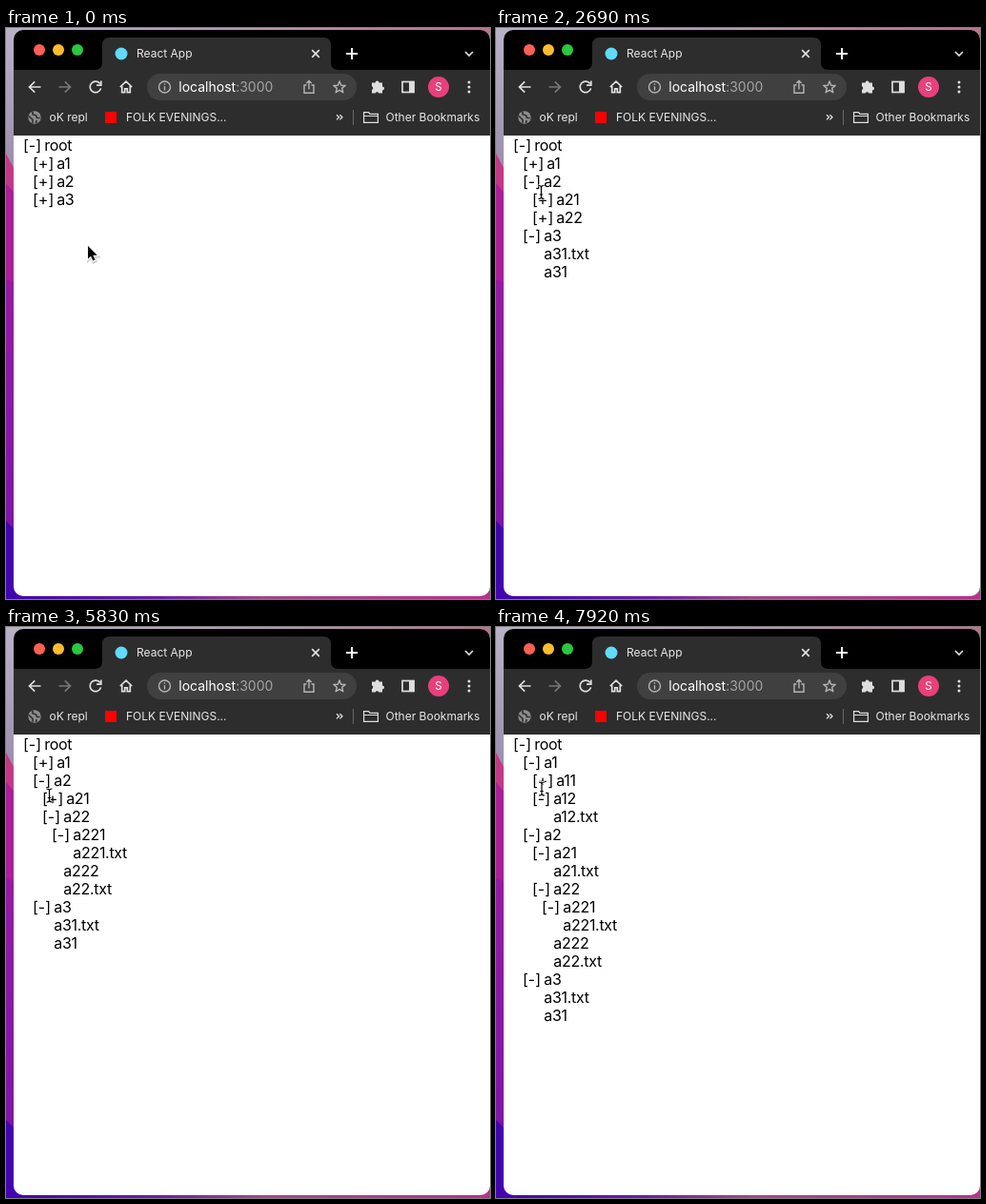
Recreate the animation shown at these times as an HTML page. Size 508 by 600 pixels, loop 8000 ms.

```html
<!DOCTYPE html>
<html lang="en">
<head>
<meta charset="utf-8">
<title>Folder tree</title>
<style>
  html, body { margin: 0; width: 100%; height: 100%; overflow: hidden; background: #fff; }
  svg { display: block; }
  text { font-family: Inter, "Open Sans", sans-serif; font-feature-settings: "calt" 0; white-space: pre; }
  .ui { font-size: 12px; fill: #e8e8e8; }
  .url { font-size: 14px; fill: #fff; }
  .icon { fill: none; stroke: #dedede; stroke-width: 1.7; }
  .thin { stroke: #b4b4b4; stroke-width: 1.4; }
  #tree { font-size: 16px; fill: #000; }
  #tree .name { letter-spacing: -.3px; }
</style>
</head>
<body>
<svg width="508" height="600" viewBox="0 0 508 600">
  <defs>
    <clipPath id="frame"><rect x="8" y="2" width="500" height="595" rx="10"/></clipPath>
    <linearGradient id="side" x1="0" y1="0" x2="0" y2="1">
      <stop offset="0" stop-color="#b9b2c6"/><stop offset=".24" stop-color="#9c8fae"/>
    </linearGradient>
    <linearGradient id="violet" x1="0" y1="0" x2="0" y2="1">
      <stop offset="0" stop-color="#961ca4"/><stop offset="1" stop-color="#7716a6"/>
    </linearGradient>
    <linearGradient id="top">
      <stop offset="0" stop-color="#b9b2c6"/><stop offset=".5" stop-color="#b59ab2"/><stop offset="1" stop-color="#c0708f"/>
    </linearGradient>
    <linearGradient id="base">
      <stop offset="0" stop-color="#4206b0"/><stop offset=".3" stop-color="#6a1fa6"/>
      <stop offset=".52" stop-color="#a04a86"/><stop offset="1" stop-color="#b8318f"/>
    </linearGradient>
  </defs>

  <!-- desktop -->
  <rect width="508" height="600" fill="url(#side)"/>
  <path d="M0 132L16 162V300H0Z" fill="#c23a86"/>
  <path d="M0 163L16 182V300H0Z" fill="#ab1f98"/>
  <path d="M0 264L16 270V600H0Z" fill="url(#violet)"/>
  <path d="M0 518L16 534V600H0Z" fill="#4206b0"/>
  <rect x="12" width="496" height="20" fill="url(#top)"/>
  <rect x="12" y="580" width="496" height="20" fill="url(#base)"/>

  <g clip-path="url(#frame)">
    <rect x="8" y="2" width="500" height="595" fill="#fff"/>
    <rect x="8" y="2" width="500" height="42" fill="#000"/>
    <rect x="8" y="44" width="500" height="69" fill="#2d2d2d"/>
    <path d="M93 44Q101 44 101 36V18Q101 10 109 10H333Q341 10 341 18V36Q341 44 349 44Z" fill="#2d2d2d"/>
  </g>

  <!-- tab strip -->
  <circle cx="35" cy="23" r="6" fill="#ff5f57"/>
  <circle cx="55" cy="23" r="6" fill="#febc2e"/>
  <circle cx="75" cy="23" r="6" fill="#28c840"/>
  <circle cx="121" cy="27" r="6.5" fill="#61dafb"/>
  <text class="ui" x="137" y="31">React App</text>
  <g class="icon">
    <path d="M321.2 23.2l7.6 7.6m0-7.6l-7.6 7.6"/>
    <path d="M357 27h12M363 21v12" stroke="#fff" stroke-width="2"/>
    <path d="M482 25l4 4 4-4"/>
  </g>

  <!-- toolbar -->
  <rect x="148" y="48" width="220" height="28" rx="14" fill="#404040"/>
  <g class="icon">
    <path d="M36.5 62H24.5m5.7-5.7L24.5 62l5.7 5.7"/>
    <path d="M55.5 62h12m-5.7-5.7l5.7 5.7-5.7 5.7" stroke="#777"/>
    <path d="M98.8 58.6A5.8 5.8 0 1 0 99.6 63.4M99.8 55.5v4.7h-4.7"/>
    <path d="M119.8 62L126 56.2l6.200 5.800M121.700 61v6.600h3v-3.800h2.600v3.800h3V61"/>
  </g>
  <g class="icon thin">
    <circle cx="166.500" cy="62" r="6"/>
    <path d="M166.500 61.200v4.300M166.500 58.300v1.500"/>
    <path d="M315.500 60h-2.500v8.300h10V60h-2.500M318 64.500v-9m-2.700 2.600L318 55.400l2.700 2.700"/>
    <path id="star" stroke-linejoin="round"/>
  </g>
  <text class="url" x="181.300" y="67">localhost<tspan fill="#a5a5a5">:3000</tspan></text>
  <path d="M384 57.500h3.600a2 2 0 1 1 4 0H395v4a2 2 0 1 1 0 4V68.500h-3.700a1.900 1.900 0 0 0-3.600 0H384v-3.600a1.900 1.900 0 0 0 0-3.600Z" fill="#dedede"/>
  <rect class="icon" x="416" y="56.500" width="12" height="11"/>
  <rect x="423" y="56" width="5.500" height="12" fill="#dedede"/>
  <circle cx="454" cy="62" r="11" fill="#e8407a"/>
  <text x="454" y="66" font-size="11.500" fill="#fff" text-anchor="middle">S</text>
  <g fill="#dedede">
    <circle cx="486" cy="57" r="1.500"/><circle cx="486" cy="62" r="1.500"/><circle cx="486" cy="67" r="1.500"/>
  </g>

  <!-- bookmarks -->
  <circle cx="30" cy="94" r="6.700" fill="#8d8d8d"/>
  <path d="M24 92.500l4 3.800v3.500M28 88v2.700l3.500 1.300 1 2.500h3.200M31.500 100l.5-3" fill="none" stroke="#333" stroke-width="1.700"/>
  <text class="ui" x="45.500" y="98">oK repl</text>
  <rect x="104" y="88" width="12" height="12" fill="#f00"/>
  <text class="ui" x="126" y="98">FOLK EVENINGS...</text>
  <path class="icon" stroke-width="1.300" d="M347 91.200l2.600 2.600-2.600 2.600m3.400-5.200l2.600 2.600-2.600 2.600" style="stroke-width:1.300"/>
  <path d="M364.500 86v16" stroke="#686868"/>
  <path class="icon" style="stroke-width:1.200" d="M375.600 99.400V88.600h5l1.500 1.800h8.300v9ZM375.600 92.500h14.800"/>
  <text class="ui" x="398.500" y="98">Other Bookmarks</text>

  <g id="tree"></g>

  <g id="arrow">
    <path d="M0 0V13.600L3.100 10.700 5.300 15.600 7.500 14.600 5.300 9.800H9.700Z" transform="translate(.5 1.300)" fill="none" stroke="#000" stroke-opacity=".2" stroke-width="3"/>
    <path d="M0 0V13.600L3.100 10.700 5.300 15.600 7.500 14.600 5.300 9.800H9.700Z" fill="#000" stroke="#fff" stroke-width="2" paint-order="stroke"/>
  </g>
  <g id="beam" fill="none">
    <path class="bar" stroke="#fff" stroke-width="2.600"/>
    <path class="bar" stroke="#000" stroke-width="1.200"/>
  </g>
</svg>
<script>
const LOOP = 8000, LINE = 19, INDENT = 10;
const $ = id => document.getElementById(id);

const tree = ['root', [
  ['a1', [['a11', []], ['a12', [['a12.txt']]]]],
  ['a2', [
    ['a21', [['a21.txt']]],
    ['a22', [['a221', [['a221.txt']]], ['a222'], ['a22.txt']]]
  ]],
  ['a3', [['a31.txt'], ['a31']]]
]];

// time at which each folder opens
const opens = { root: 0, a3: 1190, a2: 2240, a22: 3440, a221: 4340, a21: 6130, a1: 6880, a12: 7920 };

// pointer moves: first step, last step, step count, rests on first step, end x, end y
const moves = [
  [150, 890, 6, 0, 37, 181],
  [1190, 1940, 6, 1, 37.5, 161],
  [2240, 2390, 2, 1, 38, 154],
  [2540, 2990, 4, 0, 57, 191],
  [3440, 3440, 1, 0, 58, 198],
  [3590, 3740, 2, 0, 56, 214],
  [4040, 4040, 1, 0, 56, 219],
  [4340, 5240, 7, 1, 40, 167],
  [5390, 5830, 4, 0, 45.5, 177],
  [6130, 6580, 4, 1, 37.5, 143],
  [6880, 7620, 6, 1, 48, 174],
  [7920, 7920, 1, 0, 48, 170]
];
const START = [86, 229], ON_TEXT = 740;

const ease = p => p * p * (3 - 2 * p);

function pointerAt(t) {
  let [x, y] = START;
  for (const [from, to, count, rests, endX, endY] of moves) {
    if (t < from) break;
    const gap = (to - from) / (count - 1) || 1;
    const step = Math.min(count - 1, Math.floor((t - from) / gap + .01));
    const p = ease(rests ? step / (count - 1) : (step + 1) / count);
    x += (endX - x) * p;
    y += (endY - y) * p;
  }
  return [x, y];
}

function addText(str, x, y, cls) {
  const el = document.createElementNS('http://www.w3.org/2000/svg', 'text');
  el.setAttribute('x', x);
  el.setAttribute('y', y);
  el.setAttribute('class', cls);
  el.textContent = str;
  $('tree').append(el);
}

function drawTree(t) {
  let y = 129;
  const visit = ([name, kids], depth) => {
    const x = 18 + depth * INDENT;
    const open = t >= opens[name];
    if (kids) addText(open ? '[-]' : '[+]', x, y, 'mark');
    addText(name, x + (!kids ? 12.3 : open ? 22.3 : 25.2), y, 'name');
    y += LINE;
    if (kids && open) kids.forEach(kid => visit(kid, depth + 1));
  };
  $('tree').replaceChildren();
  visit(tree, 0);
}

const starPoints = Array.from({ length: 10 }, (_, i) => {
  const r = i % 2 ? 2.8 : 6.5, a = i * Math.PI / 5;
  return (350 + r * Math.sin(a)).toFixed(2) + ' ' + (62.5 - r * Math.cos(a)).toFixed(2);
});
$('star').setAttribute('d', 'M' + starPoints.join('L') + 'Z');

for (const bar of document.querySelectorAll('.bar'))
  bar.setAttribute('d', 'M-3-7Q0-7 0-5Q0-7 3-7M0-5V5M-3 7Q0 7 0 5Q0 7 3 7M-1.7 2.500H1.7');

let shown = -1;
function render(now) {
  const t = now % LOOP;
  const count = Object.values(opens).filter(at => t >= at).length;
  if (count !== shown) drawTree(t);
  shown = count;

  const [x, y] = pointerAt(t), onText = t >= ON_TEXT;
  $('arrow').style.display = onText ? 'none' : '';
  $('beam').style.display = onText ? '' : 'none';
  $(onText ? 'beam' : 'arrow').setAttribute('transform', `translate(${x} ${y})`);
}

const begin = performance.now();
(function frame() {
  render(performance.now() - begin);
  requestAnimationFrame(frame);
})();
</script>
</body>
</html>
```
